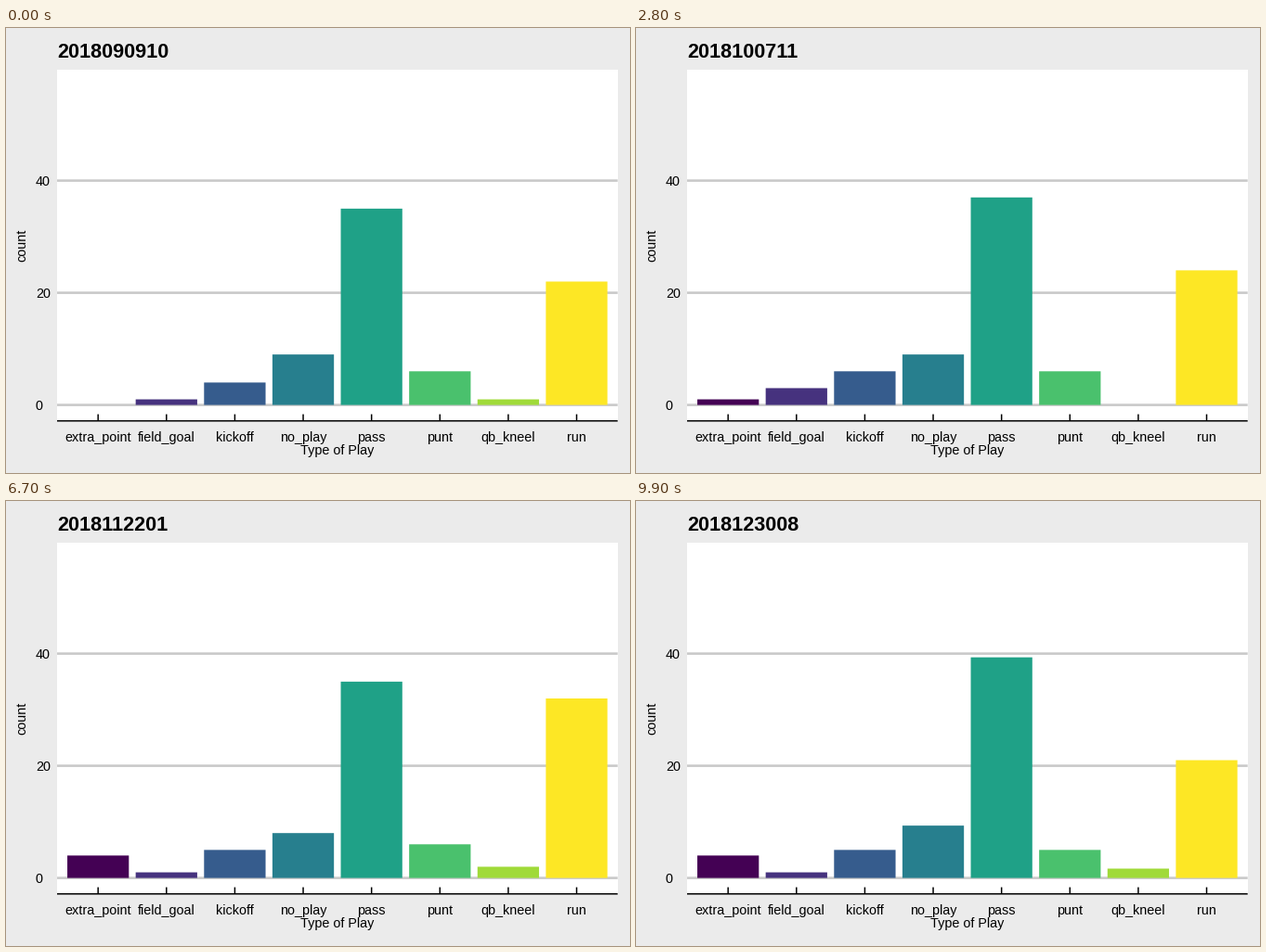
These frames come from a looping animation (672 px wide and 480 px high, 10000 ms). A matplotlib script:

```python
import matplotlib.pyplot as plt
import numpy as np
from matplotlib.animation import FuncAnimation
from matplotlib.patches import Rectangle

W, H, DPI = 672, 480, 100
FRAMES, INTERVAL = 100, 100
PT = 72 / DPI

LEFT, RIGHT, TOP, BOTTOM = 55, 658.7, 44.6, 423.8
ZERO, UNIT = 406.6, 6.05          # pixel row of count 0, pixels per count
STEP = (RIGHT - LEFT) / 8.2
BAR = 0.9 * STEP
FONT, SMALL, BIG = "Liberation Sans", 14.4, 21.6

PLAYS = ["extra_point", "field_goal", "kickoff", "no_play",
         "pass", "punt", "qb_kneel", "run"]
GAMES = [
    ("2018090910", (0, 1, 4, 9, 35, 6, 1, 22)),
    ("2018091612", (2, 2, 4, 8, 26, 6, 2, 27)),
    ("2018092312", (1, 2, 4, 9, 39, 5, 0, 23)),
    ("2018093003", (2, 4, 5, 11, 29, 2, 0, 32)),
    ("2018100711", (1, 3, 6, 9, 37, 6, 0, 24)),
    ("2018101410", (4, 4, 2, 9, 30, 3, 0, 42)),
    ("2018102110", (2, 2, 5, 9, 39, 5, 0, 21)),
    ("2018110500", (2, 1, 5, 6, 37, 3, 0, 19)),
    ("2018111111", (3, 2, 5, 7, 40, 4, 1, 28)),
    ("2018111800", (2, 3, 5, 8, 35, 4, 0, 30)),
    ("2018112201", (4, 1, 5, 8, 35, 6, 2, 32)),
    ("2018112900", (1, 2, 3, 9, 35, 4, 2, 25)),
    ("2018120912", (2, 4, 6, 13, 57, 2, 0, 36)),
    ("2018121604", (0, 1, 6, 9, 42, 4, 0, 22)),
    ("2018122308", (3, 2, 5, 8, 28, 4, 2, 25)),
    ("2018123008", (4, 1, 7, 10, 48, 3, 3, 19)),
]

# Each game is held, then morphs into the next over its last three steps.
MORPH = 3
STARTS = [round(20 * k / 3) if k < 6 else 40 + 6 * (k - 6)
          for k in range(len(GAMES) + 1)]

fig = plt.figure(figsize=(W / DPI, H / DPI), dpi=DPI, facecolor="#EBEBEB")
ax = fig.add_axes([0, 0, 1, 1])
ax.set(xlim=(0, W), ylim=(H, 0))
ax.axis("off")


def label(x, y, text, size=SMALL, **kw):
    kw = {"va": "baseline", "color": "black", **kw}
    return ax.text(x, y, text, fontsize=size * PT, family=FONT, **kw)


def line(x0, y0, x1, y1, width, color, z):
    ax.plot([x0, x1], [y0, y1], lw=width * PT, color=color, zorder=z,
            solid_capstyle="butt", snap=False)


ax.add_patch(Rectangle((LEFT, TOP), RIGHT - LEFT, BOTTOM - TOP,
                       fc="white", lw=0, zorder=0))
for count in (0, 20, 40):
    y = ZERO - count * UNIT
    line(LEFT, y, RIGHT, y, 2.6, "#C9C9C9", 1)
    label(31.9, y + 5.2, str(count))

line(LEFT, BOTTOM, RIGHT, BOTTOM, 1.5, "black", 4)
bars = []
for i, (play, color) in enumerate(zip(PLAYS, plt.cm.viridis(np.linspace(0, 1, 8)))):
    x = LEFT + (i + 0.6) * STEP
    line(x, BOTTOM, x, 416.6, 1.5, "black", 4)
    label(x, 446, play, ha="center")
    bar = Rectangle((x - BAR / 2, ZERO), BAR, 0, fc=color, lw=0,
                    zorder=3, snap=False)
    bars.append(ax.add_patch(bar))

label((LEFT + RIGHT) / 2, 460, "Type of Play", ha="center")
label(24, (TOP + BOTTOM) / 2, "count", rotation=90, ha="right", va="center")
title = label(LEFT, 32, "", BIG, weight="bold")


def tween(a, b, p):
    # Bars missing on one side appear or vanish only once the morph is done.
    return a + (b - a) * p if a and b else a


def update(n):
    k = max(i for i, s in enumerate(STARTS) if s <= n)
    name, now = GAMES[k]
    after = GAMES[(k + 1) % len(GAMES)][1]
    p = max(0, n - STARTS[k + 1] + MORPH) / MORPH
    for bar, a, b in zip(bars, now, after):
        bar.set_height(-tween(a, b, p) * UNIT)
    title.set_text(name)
    return [*bars, title]


anim = FuncAnimation(fig, update, frames=FRAMES, interval=INTERVAL,
                     repeat=True, repeat_delay=0)
plt.show()
```
